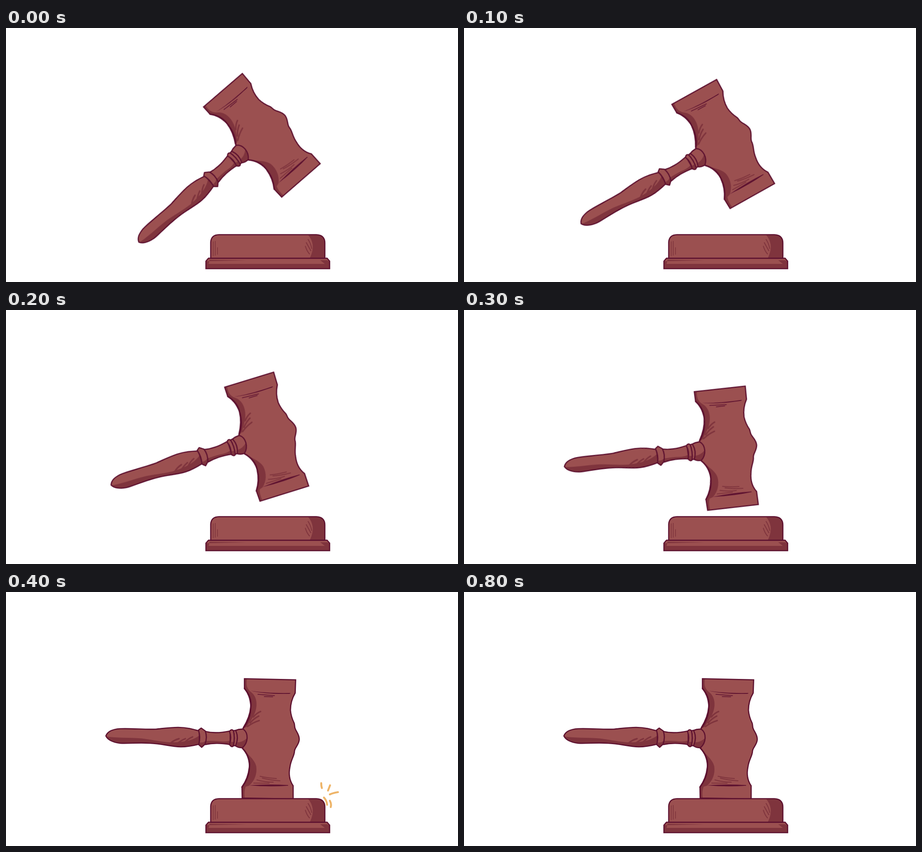
An HTML page that plays this animation: 998 px wide and 561 px high, repeating every 1000 ms.

```html
<!DOCTYPE html>
<html lang="en">
<head>
<meta charset="utf-8">
<title>Gavel</title>
<style>
  html, body { margin: 0; width: 100%; height: 100%; overflow: hidden; background: #fff; }
  svg {
    display: block; width: 998px; height: 561px;
    fill: none; stroke-linecap: round; stroke-linejoin: round;
  }
  .wood { fill: #9b5050; }
  .shade { fill: #7f343d; }
  .hatch { stroke: #7f343d; stroke-width: 2; }
  .thick { stroke: #7f343d; stroke-width: 3.4; }
  .line { stroke: #5e1230; stroke-width: 2.6; }
  .sharp { stroke-linejoin: miter; }
  .ink { fill: #5e1230; }
  #gavel { transform-origin: 430px 256px; }
  #sparks { stroke: #eeb468; stroke-width: 4.2; }
</style>
</head>
<body>
<svg viewBox="0 0 998 561">
  <defs>
    <path id="head" d="M526.5 191.5L639.5 194L638.5 223C632 234 628 247 628 261C629 272 632 281 636 289C638 293 636 297 639 303C642 310 648 316 647.5 326C647 337 638 343 637 351C637 362 629 370 627 386C624 400 625 415 634 428L634 457L521.5 455L521 431C530 419 538 405 537.5 384C537 367 531 355 522 345L523 302C536 287 541 269 540.5 251C539 234 535 224 526.5 213Z"/>
    <path id="grip" d="M220.5 318C224 308 235 303 252 302C280 301 305 304 330 303C350 301 363 299 380 299C399 299 413 303 427 307L427 336C411 340 399 342 386 342C362 341 344 335 318 334C292 332 274 335 252 334C236 332 225 327 220.5 318Z"/>
    <path id="neck" d="M440 308C456 312 476 311 495 307L495 337C478 334 457 333 440 337Z"/>
    <path id="collar" d="M425 305L431 300.5L440 307Q445 321 439.5 336L432 343L425.5 337Q430 321 425 305Z"/>
    <path id="ferrule" d="M506 306C513 303 518 302.5 524 303C536 312 535 333 522 344C516 344 511 343 507 340Z"/>
    <path id="ringA" d="M493.5 308Q497 302 502 306Q506 322 502 340Q498 344 493.5 337Q499 322 493.5 308Z"/>
    <path id="ringB" d="M502 307Q506 304 508 308Q514 322 507.5 338Q505 341 502 338Q506 322 502 307Z"/>
    <path id="slab" d="M452 508.5V473Q453 457 470 456.5H685Q704 457 704 475V508.5Z"/>
    <path id="foot" d="M441.5 531.5V515L447 508.5H709L714.5 515V531.5Z"/>
  </defs>

  <g id="gavel">
    <use href="#head" class="wood"/>
    <path class="shade" d="M526.5 192H532C530 204 531 213 541 221C550 228 554 238 553 252C552 267 543 281 531 298L523 302C536 287 541 269 540.5 251C539 234 535 224 526.5 213Z"/>
    <path class="shade" d="M522 345C533 358 550 371 552.5 385C555 401 549 418 536 428L529 430Q525 441 527 455H521.5L521 431C530 419 538 405 537.5 384C537 367 531 355 522 345Z"/>
    <path class="thick" d="M562 264Q554 267 546 276M558 274Q548 279 539 289M559 284Q546 288 533 297"/>
    <path class="hatch" d="M561 407Q578 411 597 412M566 411Q585 416 605 417M554 415Q571 420 590 420M547 422L581 422.5"/>
    <path class="line" style="stroke-width:1.4" d="M556 226L593 229M570 231L589 231.5"/>
    <path class="ink" d="M540 218Q575 224 628 223Q628 225 623 225Q572 226 540 218ZM536 427Q580 424 623 426.5Q624 428 620 428Q580 431 536 427Z"/>
    <use href="#head" class="line sharp"/>
    <path class="line" style="stroke-width:3.2" d="M526.5 213Q543 232 540.5 254Q539 276 524 300M522 345Q540 364 537.5 387Q535 412 521 431"/>

    <use href="#grip" class="wood"/>
    <path class="shade" d="M221 319C251 324 284 320 311 325C337 329 354 333 373 332C396 331 413 327 427 317V336C411 340 399 342 386 342C362 341 344 335 318 334C292 332 274 335 252 334C236 332 225 327 221 319Z"/>
    <path class="thick" d="M382 324Q371 327 363 334M396 324Q386 328 378 335M412 320Q402 324 394 333"/>
    <use href="#grip" class="line"/>

    <use href="#neck" class="wood"/>
    <path class="shade" d="M441 329Q462 328 476 330Q487 331 495 328V337Q465 332 440 337Z"/>
    <use href="#neck" class="line"/>
    <use href="#collar" class="wood"/>
    <path class="shade" d="M427 332Q434 334 441 329L439 336L432 343L426 337Z"/>
    <use href="#collar" class="line"/>
    <use href="#ferrule" class="wood"/>
    <path class="shade" d="M508 332Q521 333 532 323Q531 337 522 344Q513 344 507 340Z"/>
    <use href="#ferrule" class="line"/>
    <use href="#ringB" class="wood"/>
    <use href="#ringB" class="line"/>
    <use href="#ringA" class="wood"/>
    <path class="shade" d="M497 331L504 331L502 340Q498 343 494 337Z"/>
    <use href="#ringA" class="line"/>
  </g>

  <use href="#foot" class="wood"/>
  <path class="shade" d="M442 515H449L447 521H704L694 513H709L714 516V531H442Z"/>
  <path class="shade" d="M449 512L531 513.3L449 515Z"/>
  <use href="#foot" class="line sharp"/>
  <use href="#slab" class="wood"/>
  <path class="shade" d="M667 457H685Q704 457 704 475V508H671Q679 491 677 478Q675 466 667 457Z"/>
  <path class="hatch" d="M667 467Q673 476 675 487M663 474Q668 483 673 492M661 482Q664 492 670 499"/>
  <path class="hatch" style="stroke-width:1.5" d="M457.5 472V503M462 471V502M467 485V500"/>
  <use href="#slab" class="line"/>

  <path id="sparks" d="M696 422Q696 429 697.5 433M715.5 427L711 438.5M733 442Q725 443 715 447M702 454Q708 460 709 470M715 461Q719 468 717 475"/>
</svg>
<script>
  const LOOP = 1000;

  // time in ms, shift x, shift y, turn in degrees
  const swing = [
    [0, -22.4, 30.8, -42],
    [100, -21.8, 17, -30.3],
    [200, -18.5, 6, -18.3],
    [300, -8.7, 1, -7.5],
    [400, 0, 0, 0],
    [1000, 0, 0, 0],
  ];
  const flash = [[0, 0], [400, 1], [500, 0], [1000, 0]];

  // each pose holds until the next one
  function play(id, steps, style) {
    const frames = steps.map(([time, ...pose]) => ({
      offset: time / LOOP,
      easing: 'steps(1, end)',
      ...style(...pose),
    }));
    document.getElementById(id).animate(frames, { duration: LOOP, iterations: Infinity });
  }

  play('gavel', swing, (x, y, turn) => ({
    transform: `translate(${x}px, ${y}px) rotate(${turn}deg)`,
  }));
  play('sparks', flash, opacity => ({ opacity }));
</script>
</body>
</html>
```
